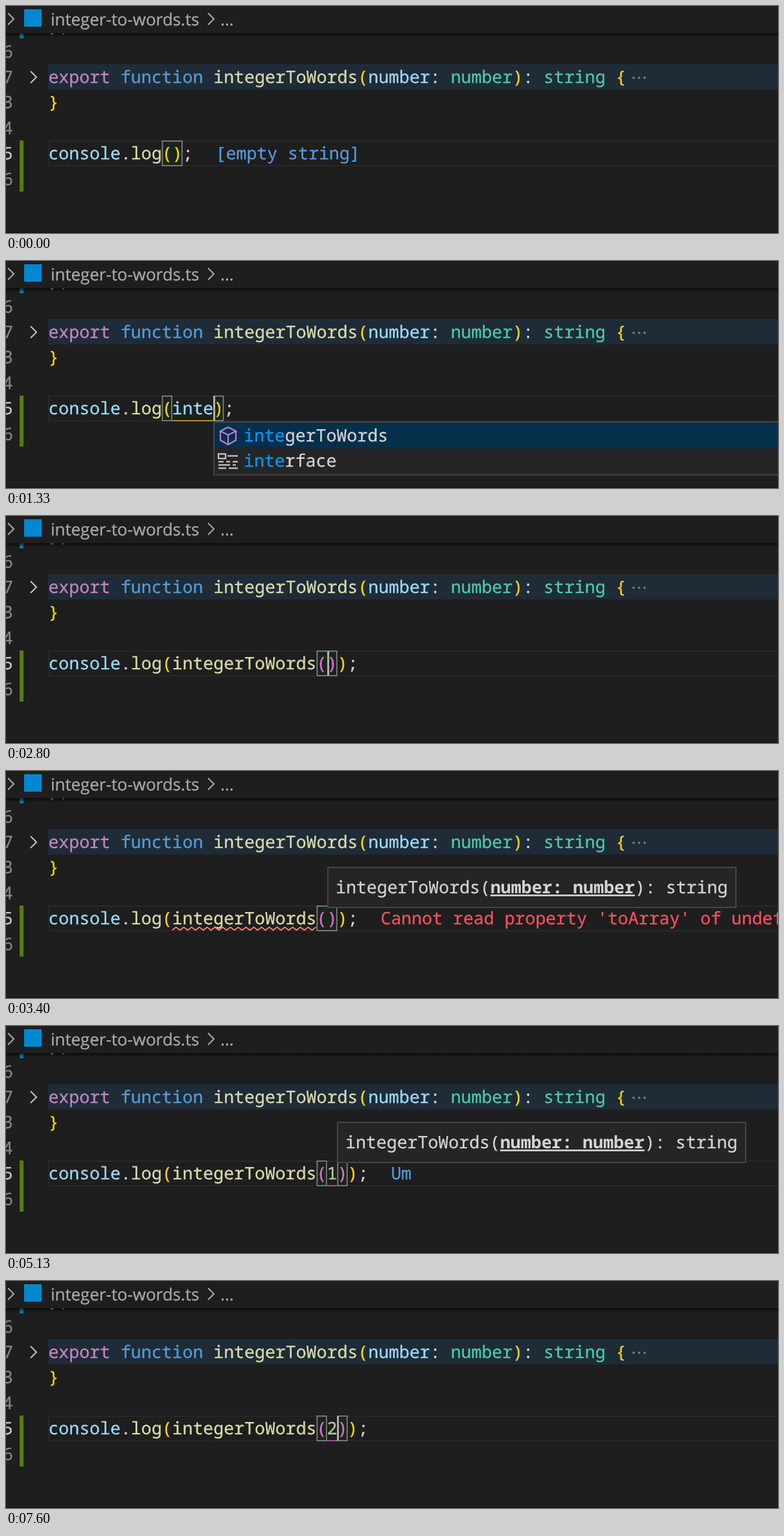
Write an HTML page that moves like this. It is 1192 by 351 pixels and loops after 8000 ms.

```html
<!DOCTYPE html>
<html lang="en">
<head>
<meta charset="utf-8">
<title>Editor session</title>
<style>
  html, body { margin: 0; width: 100%; height: 100%; overflow: hidden; background: #1e1e1e; }
  svg { display: block; width: 1192px; height: 351px; }
  text {
    font: 26.55px "Noto Sans Mono", "DejaVu Sans Mono", monospace;
    white-space: pre; text-rendering: geometricPrecision;
    color: #d4d4d4; fill: currentColor; stroke: currentColor; stroke-width: .3;
  }
  .crumb { font: 25.9px "Open Sans", "Noto Sans", sans-serif; color: #a9a9a9; }
  .keyword { color: #569cd6; } .export { color: #c586c0; } .fn { color: #dcdcaa; }
  .name { color: #9cdcfe; } .type { color: #4ec9b0; } .num { color: #b5cea8; }
  .gold { color: #ffd700; } .pink { color: #da70d6; }
  .out { color: #529be0; } .err { color: #f5515f; }
  .match { color: #0097fb; } .detail { color: #a9b4bd; }
  .line { color: #858585; } .active { color: #c6c6c6; }
  .strong { font-weight: 700; text-decoration: underline; stroke: none; }
  .stroke { fill: none; stroke: #a9a9a9; stroke-width: 2; }
  .box { fill: #252526; stroke: #454545; stroke-width: 2; }
  .pair { fill: rgba(0, 100, 0, .1); stroke: #888; stroke-width: 1.6; }
</style>
</head>
<body>
<svg viewBox="0 0 1192 351">
  <defs>
    <linearGradient id="shade" x2="0" y2="1">
      <stop stop-color="#000" stop-opacity=".65"/>
      <stop offset="1" stop-color="#000" stop-opacity="0"/>
    </linearGradient>
  </defs>
  <rect width="1192" height="351" fill="#1e1e1e"/>
  <rect y="350" width="1192" height="1" fill="#101010"/>
  <rect x="65" y="90" width="1127" height="39" fill="#1f2c38"/>
  <g id="code"></g>
  <rect x="21" y="40" width="6" height="10" fill="#0c7d9d"/>
  <rect x="21" y="208" width="6" height="79" fill="#587c0c"/>
  <path class="stroke" style="stroke:#c5c5c5" d="M38 101l9 9-9 9"/>
  <g fill="#808080"><circle cx="969" cy="111" r="1.8"/><circle cx="977.5" cy="111" r="1.8"/><circle cx="986" cy="111" r="1.8"/></g>
  <rect width="1192" height="42" fill="#1e1e1e"/>
  <rect y="42" width="1192" height="6" fill="url(#shade)"/>
  <path class="stroke" d="M3 11l9 9-9 9M312 11l9 9-9 9"/>
  <rect x="28" y="5" width="27" height="27" fill="#0288d1"/>
  <text class="crumb" x="69" y="30">integer-to-words.ts</text>
  <text class="crumb" x="331" y="30">...</text>
  <g id="live"></g>
  <g id="mouse">
    <path d="M-5-10.500h3.500L0-9l1.500-1.500H5M0-9V9M-5 10.500h3.500L0 9l1.500 1.500H5" fill="none" stroke="#111" stroke-width="3.500"/>
    <path d="M-5-10.500h3.500L0-9l1.500-1.500H5M0-9V9M-5 10.500h3.500L0 9l1.500 1.500H5" fill="none" stroke="#ccc" stroke-width="1.600"/>
  </g>
</svg>
<script>
const LOOP = 8000, CELL = 15.93, LEFT = 65.4, ROW = 39.4;
const $ = id => document.getElementById(id);
const colX = col => LEFT + col * CELL;
const baseline = row => 119 + row * ROW;
const text = (x, y, str, cls = '') => `<text x="${x}" y="${y}" class="${cls}">${str}</text>`;
const rect = (x, y, w, h, attrs) => `<rect x="${x}" y="${y}" width="${w}" height="${h}" ${attrs}/>`;

// Lays out [text, class] pieces side by side on the character grid.
function run(x, y, pieces) {
  return pieces.map(([str, cls]) => {
    const out = text(x, y, str, cls);
    x += str.length * CELL;
    return out;
  }).join('');
}

$('code').innerHTML =
  run(LEFT, baseline(-2), [['}', 'gold'], [';']]) +
  run(LEFT, baseline(0), [
    ['export', 'export'], [' '], ['function', 'keyword'], [' '], ['integerToWords', 'fn'],
    ['(', 'gold'], ['number', 'name'], [': '], ['number', 'type'], [')', 'gold'],
    [': '], ['string', 'type'], [' '], ['{', 'gold']]) +
  text(LEFT, baseline(1), '}', 'gold');

// Suggestions: [label, icon, detail]
const IN = [['in', 'word', 'in'], ['integerToWords', 'cube'], ['indexedDB', 'variable']];
const INT = [['integerToWords', 'cube'], ['interface', 'word'], ['Int16Array', 'variable']];
const INTE = [['integerToWords', 'cube'], ['interface', 'word']];

const steps = [
  [0, { word: '', color: 'name', call: null, back: 0, hint: '[empty string]', tone: 'out',
        caret: false, wave: 0, bulb: false, list: null, tip: false, row: 3 }],
  [330, { caret: true }],
  [870, { word: 'i', hint: '' }],
  [1000, { word: 'in', color: 'keyword' }],
  [1070, { list: IN }],
  [1200, { word: 'int', color: 'name', list: INT }],
  [1330, { word: 'inte', list: INTE }],
  [1670, { word: 'integerToWords', color: '', list: null }],
  [1730, { hint: 'inte is not defined', tone: 'err', wave: 4 }],
  [1800, { bulb: true }],
  [1870, { color: 'fn' }],
  [1930, { hint: '' }],
  [2200, { caret: false }],
  [2330, { bulb: false, wave: 0, hint: '[λ: integerToWords]', tone: 'out' }],
  [2800, { call: '', hint: '', caret: true }],
  [2930, { tip: true }],
  [3270, { hint: "Cannot read property 'toArray' of undefined", tone: 'err' }],
  [3330, { caret: false }],
  [3400, { wave: 14 }],
  [3600, { call: '1', hint: '', caret: true }],
  [4000, { hint: 'Um', tone: 'out' }],
  [4130, { wave: 0, caret: false }],
  [4600, { caret: true }],
  [5130, { caret: false }],
  [5400, { tip: false }],
  [5670, { row: 4, caret: true }],
  [6200, { caret: false }],
  [6400, { row: 3, back: 1, caret: true }],
  [6930, { caret: false }],
  [7400, { call: '', back: 0, hint: '', caret: true }],
  [7530, { call: '2' }]
];
const states = [];
for (const [, patch] of steps) states.push({ ...states.at(-1), ...patch });

const icons = {
  word: '<path d="M0-11h11v7H0zM14-8h16M0 1h8M12 1h6M22 1h8M0 6h18M22 6h5M0 11h12M16 11h14" fill="none" stroke="#c5c5c5" stroke-width="2.200"/>',
  cube: '<path d="M15-13l12 6V7l-12 7L3 7V-7zM3-7l12 6 12-6M15-1v15" fill="none" stroke="#b180d7" stroke-width="2.200"/>',
  variable: '<path d="M6-9H1V10h5M24-9h5V10h-5M15-6l7 3v7l-7 4-7-4v-6zM8-2l7 3 7-4" fill="none" stroke="#75beff" stroke-width="2.200"/>'
};

// Popups snap to whole pixels.
const popupX = caretX => Math.round(caretX) + 1;

function suggestions({ list, word }, caretX) {
  const x = popupX(caretX), top = 249, width = 894, n = word.length;
  const rows = list.map(([label, icon, detail], i) => {
    const mid = top + 21 + i * ROW, y = mid + 9;
    return `<g transform="translate(${x + 7} ${mid})">${icons[icon]}</g>` +
      run(x + 46, y, [[label.slice(0, n), 'match'], [label.slice(n)]]) +
      (detail ? text(x + 840, y, detail, 'detail') : '');
  }).join('');
  return rect(x, top, width, list.length * ROW + 3, 'class="box"') +
    rect(x + 1, top + 1, width - 2, ROW, 'fill="#062f4a"') + rows +
    rect(x + 872, top + 1, 21, 54, 'fill="#797979" fill-opacity=".2"');
}

function signature(caretX) {
  const x = popupX(caretX);
  return rect(x, 149, 630, 62, 'class="box"') +
    run(x + 12, 189, [['integerToWords('], ['number: number', 'strong'], ['): string']]);
}

function squiggle(from, length) {
  const end = colX(from + length);
  let x = colX(from), d = `M${x} 246`;
  for (let up = true; x + 6 <= end; up = !up) d += `L${x += 6} ${up ? 241.5 : 246}`;
  return `<path d="${d}" fill="none" stroke="#f48771" stroke-width="1.800"/>`;
}

// Touching brackets share one outline.
function bracketBoxes(open, close) {
  const box = (from, to) => rect(colX(from) + .8, 208.8, (to - from) * CELL - 1.5, 38, 'class="pair"');
  return close === open + 1 ? box(open, close + 1) : box(open, open + 1) + box(close, close + 1);
}

const bulb = '<path d="M82.500 171a9.500 9.500 0 0 0-5 17.500V192h10v-3.500a9.500 9.500 0 0 0-5-17.500zM78 194h9v2l-2 2h-5l-2-2z" fill="#fc0"/>';

function draw(s) {
  const called = s.call !== null;
  const open = called ? 12 + s.word.length : 11;
  const close = open + 1 + (called ? s.call.length : s.word.length);
  const codeEnd = close + (called ? 3 : 2);
  const onCode = s.row === 3;
  const caretX = onCode ? colX(close - s.back) : LEFT;
  const top = onCode ? 208 : 248;

  const numbers = ['6', '7', '3', '4', '5', '6'].map((n, i) =>
    text(-5, baseline(i - 1), n, i - 1 === s.row ? 'active' : 'line')).join('');
  const call = called ? [['(', 'pink'], [s.call, 'num'], [')', 'pink']] : [];

  let out = numbers +
    rect(66, top + 1, 1140, 38, 'fill="none" stroke="#282828" stroke-width="2"');
  if (onCode) {
    const guide = called ? '#a455a1' : '#b39a1c';
    out += bracketBoxes(open, close) +
      rect(colX(open + 1), 246, colX(close) - colX(open + 1), 1.8, `fill="${guide}"`);
  }
  out += run(LEFT, baseline(3), [
    ['console', 'name'], ['.'], ['log', 'fn'], ['(', 'gold'], [s.word, s.color],
    ...call, [')', 'gold'], [';']]);
  out += text(colX(codeEnd) + 35.2, baseline(3), s.hint, s.tone);
  if (s.wave) out += squiggle(12, s.wave);
  if (s.bulb) out += bulb;
  if (s.caret) out += rect(Math.round(caretX), top + 1, 3, 38, 'fill="#aeafad"');
  if (s.list) out += suggestions(s, caretX);
  if (s.tip) out += signature(caretX);
  $('live').innerHTML = out;
}

function moveMouse(t) {
  const visible = t >= 5530 && t < 7400;
  $('mouse').setAttribute('visibility', visible ? 'visible' : 'hidden');
  const p = Math.min(1, Math.max(0, (t - 5930) / 380));
  const ease = p * p * (3 - 2 * p);
  $('mouse').setAttribute('transform', `translate(${440 + 63 * ease} ${284 - 56 * ease})`);
}

let shown = -1;
const start = performance.now();
function frame() {
  const t = Math.max(0, performance.now() - start) % LOOP;
  const index = steps.findLastIndex(([time]) => time <= t);
  if (index !== shown) draw(states[shown = index]);
  moveMouse(t);
  requestAnimationFrame(frame);
}
frame();
</script>
</body>
</html>
```
